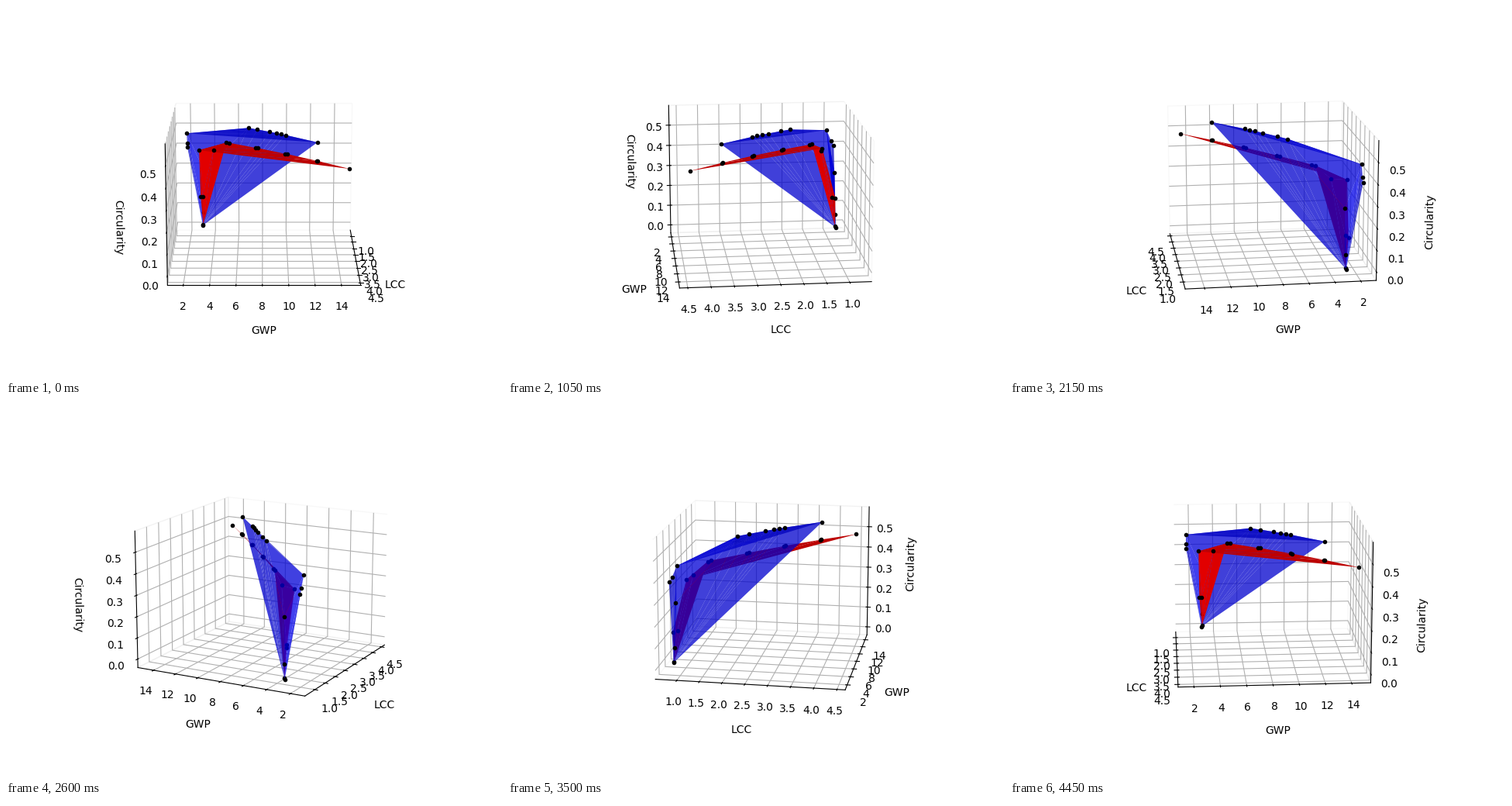
A matplotlib script for the animation above (4.5 s loop, 640 px wide and 480 px high).

```python
import numpy as np
import matplotlib.pyplot as plt
from matplotlib.animation import FuncAnimation
from mpl_toolkits.mplot3d.art3d import Poly3DCollection

FRAMES, INTERVAL, STEP, ELEV = 90, 50, 4, 15
LIMITS = np.array([(0.525, 4.675), (0.80, 15.46), (-0.0407, 0.5973)])
BOX = np.array([4, 4, 3])


def fan(apex, chain, reverse=False):
    """Triangles joining one point to each consecutive pair of a chain."""
    pairs = zip(chain, chain[1:])
    return [(apex, b, a) if reverse else (apex, a, b) for a, b in pairs]


def blue_surface():
    """A steep front along one cost line, with a rim at the lowest GWP."""
    rim = [(0.80, 1.75, 0.394), (0.867, 1.75, 0.417), (0.975, 1.75, 0.470)]
    start, end = 0.787, 3.70

    def on_line(cost):
        bulge = 0.004 * (cost - start) * (end - cost)
        return 2.97 + 3.17 * (cost - start) - bulge

    foot = [(c, on_line(c), z)
            for c, z in [(start, 0), (0.81, 0.068), (0.832, 0.279)]]
    crest = [(c, on_line(c), 0.557 - 0.0043 * (end - c) ** 2)
             for c in (2.02, 2.25, 2.56, 2.72, 2.84, 2.95, end)]
    triangles = ([(0, 1, 3), (1, 2, 3)]
                 + fan(2, range(3, 13), reverse=True)
                 + fan(3, range(4, 13)))
    return np.array(rim + foot + crest), triangles


def red_surface():
    """Two evenly spaced rows that meet at a tip, above a narrow foot."""
    corners = [(0.793, 2.82, 0.146), (0.884, 2.99, 0.151),
               (1.116, 2.76, 0.394), (1.19, 3.98, 0.398), (0.80, 3.00, 0.005)]
    tip = np.array([4.41, 14.54, 0.473])
    starts = np.array([(1.45, 5.05, 0.447), (1.51, 5.30, 0.449)])
    rows = [tip + (start - tip) * [rest, rest, rest ** 2]
            for rest in np.linspace(1, 0, 5) for start in starts][:-1]
    triangles = ([(0, 1, 4), (0, 2, 1), (1, 2, 3), (1, 3, 4), (4, 3, 5)]
                 + fan(2, [3, *range(5, 14)], reverse=True))
    return np.array(corners + rows), triangles


fig = plt.figure(figsize=(6.4, 4.8), dpi=100)
ax = fig.add_subplot(projection="3d", computed_zorder=False)
ax.set_xlabel("LCC", labelpad=10)
ax.set_ylabel("GWP", labelpad=10)
ax.set_zlabel("Circularity", labelpad=10)
for axis in (ax.xaxis, ax.yaxis, ax.zaxis):
    axis.pane.fill = False


def add_surface(points, triangles, color, alpha=None):
    mesh = Poly3DCollection(points[np.array(triangles)], facecolors=color,
                            shade=True, alpha=alpha, linewidths=0.2)
    ax.add_collection3d(mesh)
    dots = ax.scatter(*points.T, c="k", marker=".", s=36, depthshade=False)
    return points, mesh, dots


surfaces = [add_surface(*blue_surface(), "b", 0.75),
            add_surface(*red_surface(), "r")]
ax.set(xlim=LIMITS[0], ylim=LIMITS[1], zlim=LIMITS[2])


def nearness(points, azim):
    """Largest depth of a point set towards the viewer."""
    az, el = np.radians([azim, ELEV])
    view = np.array([np.cos(az) * np.cos(el), np.sin(az) * np.cos(el),
                     np.sin(el)])
    low, high = LIMITS.T
    return (((points - low) / (high - low) - 0.5) * BOX @ view).max()


def update(frame):
    azim = frame * STEP
    # A tiny offset settles which side the axes take when seen edge-on.
    azim += 1e-6 * np.cos(np.radians(azim))
    ax.view_init(elev=ELEV, azim=azim)
    ordered = sorted(surfaces, key=lambda s: nearness(s[0], azim))
    for level, (_, mesh, dots) in enumerate(ordered):
        mesh.set_zorder(10 + 2 * level)
        dots.set_zorder(11 + 2 * level)
    return []


anim = FuncAnimation(fig, update, frames=FRAMES, interval=INTERVAL,
                     init_func=lambda: [], repeat=True)
plt.show()
```
